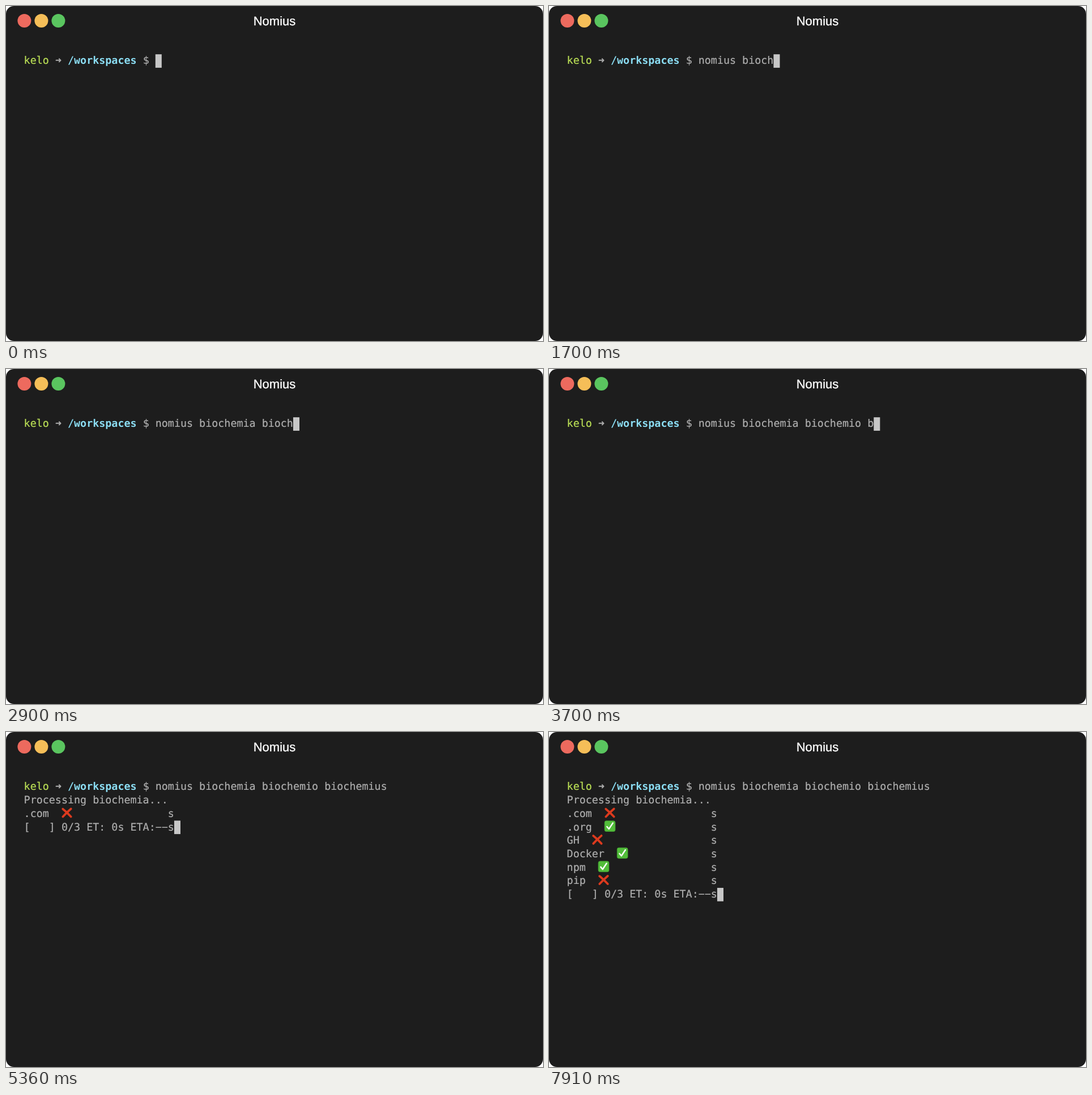
These frames come from a looping animation (948x591 px, 8 s). An HTML page:

```html
<!DOCTYPE html>
<html lang="en">
<head>
<meta charset="utf-8">
<title>Terminal</title>
<style>
  html, body { margin: 0; width: 100%; height: 100%; overflow: hidden; background: #fff; }
  svg { display: block; width: 100vw; height: 100vh; }
  text { white-space: pre; text-rendering: geometricPrecision; }
  .mono { font: 18.36px "DejaVu Sans Mono", monospace; fill: #afafaf; }
  .mono text { stroke: #afafaf; stroke-width: .2; }
  .title {
    font: 22px "Liberation Sans", Arial, sans-serif; text-anchor: middle;
    fill: #fff; stroke: #fff; stroke-width: .35;
  }
  .mono .user { fill: #bce156; stroke: #bce156; }
  .mono .path { fill: #8bddf3; stroke: none; font-weight: bold; }
</style>
</head>
<body>
<svg viewBox="0 0 948 591" xmlns="http://www.w3.org/2000/svg">
  <defs>
    <g id="cross" fill="none" stroke="#dc3a1e" stroke-width="3.8" stroke-linecap="round">
      <path d="M-7.3-6.8Q0-1 7.2 7M7.2-7Q-1 0-7.2 7"/>
    </g>
    <g id="check">
      <rect x="-9.4" y="-9.4" width="18.8" height="18.8" rx="3" fill="#52bd3a" stroke="#45a533" stroke-width=".8"/>
      <path d="M-5.2.8L-1.8 4.9L5.2-5.6" fill="none" stroke="#fff" stroke-width="2.4"
        stroke-linecap="round" stroke-linejoin="round"/>
    </g>
  </defs>
  <rect width="948" height="591" rx="14" fill="#1d1d1d"/>
  <circle cx="32.4" cy="26" r="12" fill="#ed6a5e"/>
  <circle cx="62.4" cy="26" r="12" fill="#f5be58"/>
  <circle cx="92.4" cy="26" r="12" fill="#5ac55f"/>
  <text class="title" x="474" y="34">Nomius</text>
  <g id="screen" class="mono"></g>
  <rect id="cursor" width="11.06" height="23.72" fill="#c7c7c7"/>
</svg>
<script>
const LOOP = 8000;
const CELL = { w: 11.055, h: 23.72 };
const ORIGIN = { x: 31.6, y: 85.2 };
const BASELINE = 17.2;
const PROMPT_COLS = 21;
const COMMAND = "nomius biochemia biochemio biochemius";
const ENTER = 4700, START = 5290;
const BAR = "[   ] 0/3 ET: 0s ETA:\u2212\u2212s";

// Each word is typed at one key per 100 ms, with a pause before the next.
const BURSTS = [
  { at: 100, keys: 7 },
  { at: 1300, keys: 10 },
  { at: 2500, keys: 10 },
  { at: 3700, keys: 10 }
];

const RESULTS = [
  { at: 5360, label: ".com", mark: "cross" },
  { at: 5980, label: ".org", mark: "check" },
  { at: 6670, label: "GH", mark: "cross" },
  { at: 6980, label: "Docker", mark: "check" },
  { at: 7460, label: "npm", mark: "check" },
  { at: 7910, label: "pip", mark: "cross" }
];

const screen = document.getElementById("screen");
const cursor = document.getElementById("cursor");
const colX = col => ORIGIN.x + col * CELL.w;
const rowY = row => ORIGIN.y + row * CELL.h;

function add(name, attrs, content = "") {
  const el = document.createElementNS("http://www.w3.org/2000/svg", name);
  for (const key in attrs) el.setAttribute(key, attrs[key]);
  el.textContent = content;
  return screen.appendChild(el);
}

function write(col, row, content = "", style = "") {
  return add("text", { x: colX(col), y: rowY(row) + BASELINE, class: style }, content);
}

function addResult({ label, mark }, i) {
  const row = i + 2;
  const x = colX(label.length + 2) + 9.6;
  return [
    write(0, row, label),
    add("use", { href: "#" + mark, transform: `translate(${x} ${rowY(row) + 9.8})` }),
    write(23, row, "s")
  ];
}

write(0, 0, "kelo", "user");
write(5, 0, "\u279c");
write(7, 0, "/workspaces", "path");
write(19, 0, "$");
const typed = write(PROMPT_COLS, 0);
const heading = write(0, 1, "Processing biochemia...");
const bar = write(0, 2, BAR);
const results = RESULTS.map(addResult);

function show(el, visible) {
  el.setAttribute("visibility", visible ? "visible" : "hidden");
}

function keysAt(t) {
  return BURSTS.reduce((sum, { at, keys }) =>
    sum + Math.max(0, Math.min(keys, Math.floor((t - at) / 100) + 1)), 0);
}

function draw(t) {
  const keys = keysAt(t);
  const started = t >= START;
  const done = RESULTS.filter(r => t >= r.at).length;
  const barRow = done + 2;

  typed.textContent = COMMAND.slice(0, keys);
  show(heading, started);
  show(bar, started);
  bar.setAttribute("y", rowY(barRow) + BASELINE);
  results.forEach((parts, i) => parts.forEach(el => show(el, i < done)));

  let col = PROMPT_COLS + keys, row = 0;
  if (started) [col, row] = [BAR.length, barRow];
  else if (t >= ENTER) [col, row] = [0, 1];
  cursor.setAttribute("x", colX(col));
  cursor.setAttribute("y", rowY(row));
}

const origin = performance.now();
function tick() {
  draw((performance.now() - origin) % LOOP);
  requestAnimationFrame(tick);
}
tick();
</script>
</body>
</html>
```
